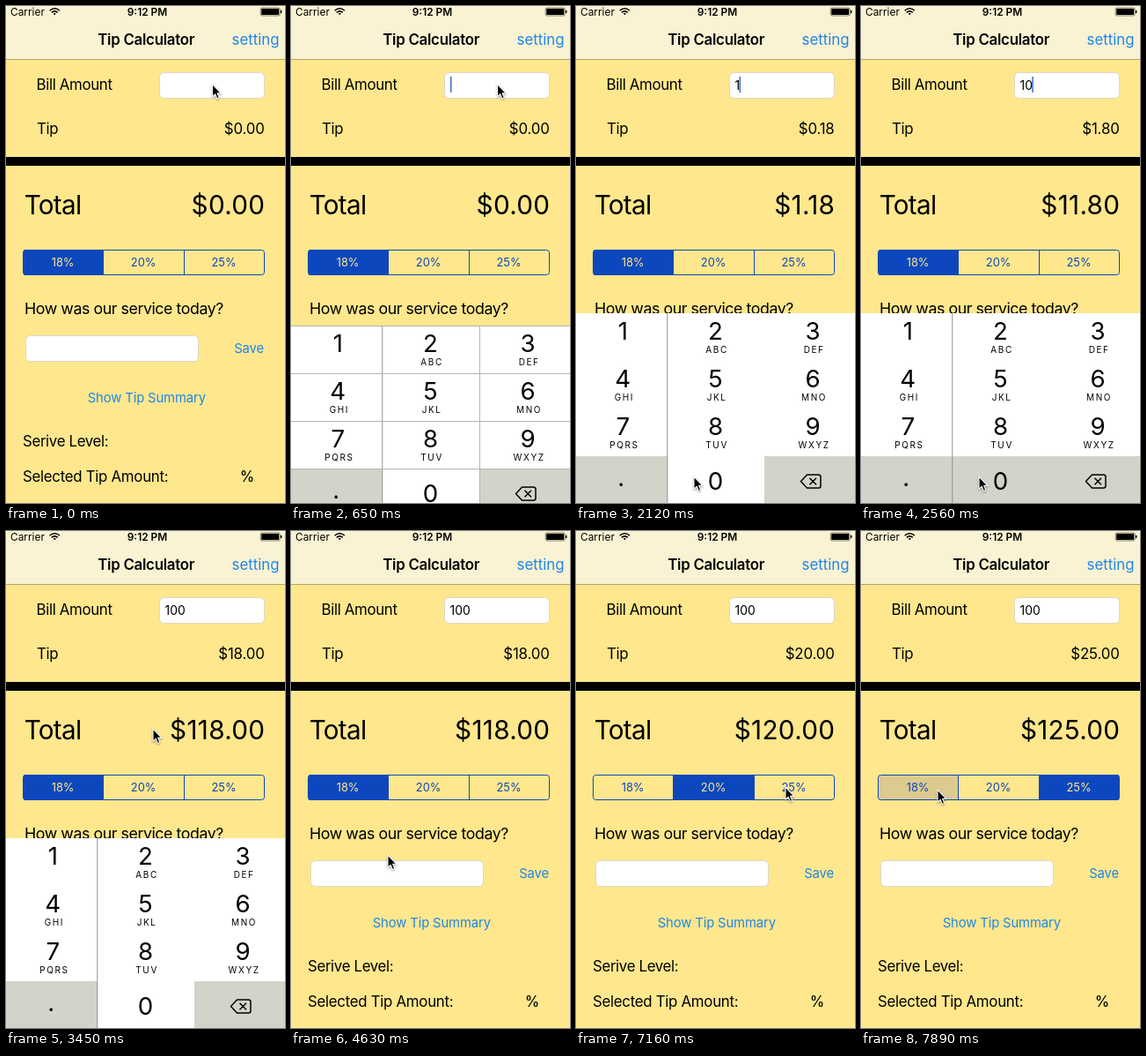
Recreate the animation shown at these times as an HTML page. Size 317x563 px, loop 8000 ms.

```html
<!DOCTYPE html>
<html lang="en">
<head>
<meta charset="utf-8">
<title>Tip Calculator</title>
<style>
  html, body { margin: 0; width: 100%; height: 100%; overflow: hidden; background: #fee78d; }
  svg { display: block; width: 100%; height: 100%; }
  text { font: 16.84px Inter, Roboto, sans-serif; letter-spacing: -.02em; }
  .mid { text-anchor: middle; }
  .end { text-anchor: end; }
  .bold { font-weight: 600; }
  .status { font-size: 11.9px; letter-spacing: 0; }
  .big { font-size: 29.7px; letter-spacing: -.025em; }
  #tip { letter-spacing: -.01em; }
  #total { letter-spacing: .01em; }
  .question { font-size: 17.8px; letter-spacing: -.025em; }
  .link { fill: #1f86ea; letter-spacing: 0; }
  .small { font-size: 14.85px; letter-spacing: -.01em; }
  .entry { font-size: 13.9px; letter-spacing: 0; }
  .segment { font-size: 12.9px; letter-spacing: 0; }
  .digit { font-size: 27.7px; letter-spacing: 0; }
  .letters { font-size: 10px; letter-spacing: 1.6px; }
  .box { fill: #fff; stroke: #ddd8c8; }
  #pointer { filter: drop-shadow(0 1px 1px #0006); }
</style>
</head>
<body>
<svg viewBox="0 0 317 563" preserveAspectRatio="none">
  <rect width="317" height="563" fill="#fee78d"/>
  <rect width="317" height="60" fill="#faf3d3"/>
  <rect y="60" width="317" height="1" fill="#b2a263"/>

  <text class="status" x="5" y="10.5">Carrier</text>
  <g fill="none" stroke="#000" stroke-width="1.5">
    <path d="M49.6 5.2Q55.3 .2 61 5.2M51.8 7.4Q55.3 4.4 58.8 7.4"/>
    <path d="M53.6 8.6Q55.3 7.3 57 8.6L55.3 10.3Z" fill="#000" stroke="none"/>
  </g>
  <text class="status bold mid" x="160.5" y="10.5">9:12 PM</text>
  <rect x="289.2" y="2" width="22" height="9" rx="1.8" fill="none" stroke="#000" stroke-width=".5"/>
  <rect x="290.2" y="3" width="20" height="7" rx=".8"/>
  <rect x="312" y="4.8" width="1.4" height="3.4" rx=".7"/>

  <text class="bold mid" x="159.2" y="44" style="letter-spacing:-.016em">Tip Calculator</text>
  <text class="link end" x="310.6" y="44">setting</text>

  <text x="34.5" y="95.2">Bill Amount</text>
  <rect class="box" x="174.5" y="75.5" width="119" height="29" rx="5"/>
  <text class="entry" id="bill" x="180.5" y="94.5"></text>
  <rect id="caret" y="80" width="1.6" height="18" fill="#4572d6"/>
  <text x="35" y="144.5">Tip</text>
  <text class="end" id="tip" x="293.6" y="144.5"></text>
  <rect y="171" width="317" height="10"/>
  <text class="big" x="20.7" y="236">Total</text>
  <text class="big end" id="total" x="294.3" y="236"></text>

  <g id="segments"></g>

  <text class="question" x="21" y="349.3">How was our service today?</text>
  <rect class="box" x="22.5" y="373.5" width="196" height="29" rx="5"/>
  <text class="link small end" x="293" y="392.5">Save</text>
  <text class="link small mid" x="159.8" y="448.5">Show Tip Summary</text>
  <text x="19" y="499">Serive Level:</text>
  <text x="19" y="539" style="letter-spacing:-.017em">Selected Tip Amount:</text>
  <text class="mid" x="273.8" y="539">%</text>

  <g id="keypad"></g>
  <path id="pointer" d="M0 0V14.2L3.2 11.3 5.3 16.4 7.7 15.4 5.6 10.4H10Z"
        stroke="#fff" stroke-width="1.1" stroke-linejoin="round"/>
</svg>
<script>
const LOOP = 8000, START = 500, BEAT = 147.6;
const BLUE = '#0d47bd', YELLOW = '#fee78d', PRESSED = '#dcca8f', GREY = '#d3d4c9';
const $ = id => document.getElementById(id);

const pointerPath = [
  [1, 234.5, 88.5], [7, 56, 371], [9, 56, 371], [11, 134, 533], [15, 134, 533],
  [20, 167, 224], [25, 167, 224], [28, 110, 367], [32, 121, 387], [37, 121, 387],
  [38, 134.5, 333], [41, 156, 290], [42, 158, 290], [45, 238, 290], [47, 240, 290], [50, 87, 293]
];
const billEntries = [[-1, ''], [9, '1'], [13, '10'], [15, '100']];
const tipRates = [[-1, 0], [42, 1], [47, 2]];
const heldSegments = [[-1, -1], [41, 1], [42, -1], [46, 2], [47, -1], [50, 0]];
const heldKeys = [[-1, ''], [8, '1'], [9, ''], [12, '0'], [13, ''], [14, '0'], [15, '']];
const caretStates = [[-1, false], [0, true], [4, false], [7, true], [18, false]];
const keypadOffsets = [[-1, 215], [0, 120], [1, 14], [2, 0], [23, 110], [24, 215]];
const rates = [18, 20, 25];

const latest = (track, beat) => track.filter(key => key[0] <= beat).pop()[1];

function along(path, beat) {
  const next = path.findIndex(key => key[0] > beat);
  if (next < 0) return path[path.length - 1].slice(1);
  if (next === 0) return path[0].slice(1);
  const [b0, x0, y0] = path[next - 1], [b1, x1, y1] = path[next];
  const p = (beat - b0) / (b1 - b0), eased = p * p * (3 - 2 * p);
  return [x0 + (x1 - x0) * eased, y0 + (y1 - y0) * eased];
}

const edges = [19.5, 110.5, 202.5, 293.5];
$('segments').innerHTML = `<clipPath id="round"><rect x="19" y="276" width="275" height="29" rx="3.5"/></clipPath>` +
  rates.map((rate, i) => `<rect id="seg${i}" clip-path="url(#round)" x="${edges[i]}" y="276" width="${edges[i + 1] - edges[i]}" height="29"/>
    <text id="label${i}" class="segment mid" x="${(edges[i] + edges[i + 1]) / 2 - .4}" y="295">${rate}%</text>`).join('') +
  `<path d="M110.5 276V305M202.5 276V305" stroke="${BLUE}"/>
   <rect x="19.5" y="276.5" width="274" height="28" rx="3" fill="none" stroke="${BLUE}"/>`;

const columns = [[0, 104, 53.3], [104, 110, 158.5], [214, 103, 269]];
const rows = [348, 402, 456, 510];
const keys = [['1', ''], ['2', 'ABC'], ['3', 'DEF'], ['4', 'GHI'], ['5', 'JKL'], ['6', 'MNO'],
  ['7', 'PQRS'], ['8', 'TUV'], ['9', 'WXYZ'], ['.', ''], ['0', ''], ['', '']];
$('keypad').innerHTML = keys.map(([digit, letters], i) => {
  const [x, width, center] = columns[i % 3], y = rows[i / 3 | 0];
  const isDot = digit === '.';
  const fill = isDot || !digit ? GREY : '#fff';
  const baseline = y + (isDot ? 34 : i > 8 ? 37.5 : 30);
  return `<rect id="key${digit}" x="${x}" y="${y}" width="${width}" height="54" fill="${fill}"/>
    <text class="digit mid" x="${isDot ? center - 2 : center}" y="${baseline}">${digit}</text>
    <text class="letters mid" x="${center + 1.6}" y="${y + 45}">${letters}</text>`;
}).join('') +
  `<path d="M103.8 348V563" stroke="#8f8f8f"/>
   <path id="gridlines" d="M0 348.5H317M0 402.5H317M0 456.5H317M0 510.5H317M214.5 348V563" stroke="#b4b4b0"/>
   <path d="M255.5 538.5L262.5 531H275.5Q278 531 278 533.5V543.5Q278 546 275.5 546H262.5ZM265.5 534.8L273 542.3M273 534.8L265.5 542.3"
         fill="none" stroke="#000" stroke-width="1.5" stroke-linejoin="round"/>`;

function draw(now) {
  const beat = Math.max(-1, Math.floor((now % LOOP - START) / BEAT + .05));
  const bill = latest(billEntries, beat), chosen = latest(tipRates, beat), held = latest(heldSegments, beat);
  const tip = bill * rates[chosen] / 100;

  $('bill').textContent = bill;
  $('tip').textContent = '$' + tip.toFixed(2);
  $('total').textContent = '$' + (+bill + tip).toFixed(2);

  $('caret').setAttribute('x', bill ? 179.8 + $('bill').getComputedTextLength() : 181);
  $('caret').setAttribute('visibility', latest(caretStates, beat) ? 'visible' : 'hidden');

  rates.forEach((_, i) => {
    $('seg' + i).setAttribute('fill', i === chosen ? BLUE : i === held ? PRESSED : YELLOW);
    $('label' + i).setAttribute('fill', i === chosen ? YELLOW : BLUE);
  });

  const offset = latest(keypadOffsets, beat), heldKey = latest(heldKeys, beat);
  $('keypad').setAttribute('transform', `translate(0 ${offset})`);
  $('gridlines').setAttribute('visibility', offset ? 'visible' : 'hidden');
  for (const key of ['0', '1']) $('key' + key).setAttribute('fill', key === heldKey ? GREY : '#fff');

  $('pointer').setAttribute('transform', `translate(${along(pointerPath, beat)})`);
}

function tick() {
  draw(performance.now());
  requestAnimationFrame(tick);
}
tick();
</script>
</body>
</html>
```
